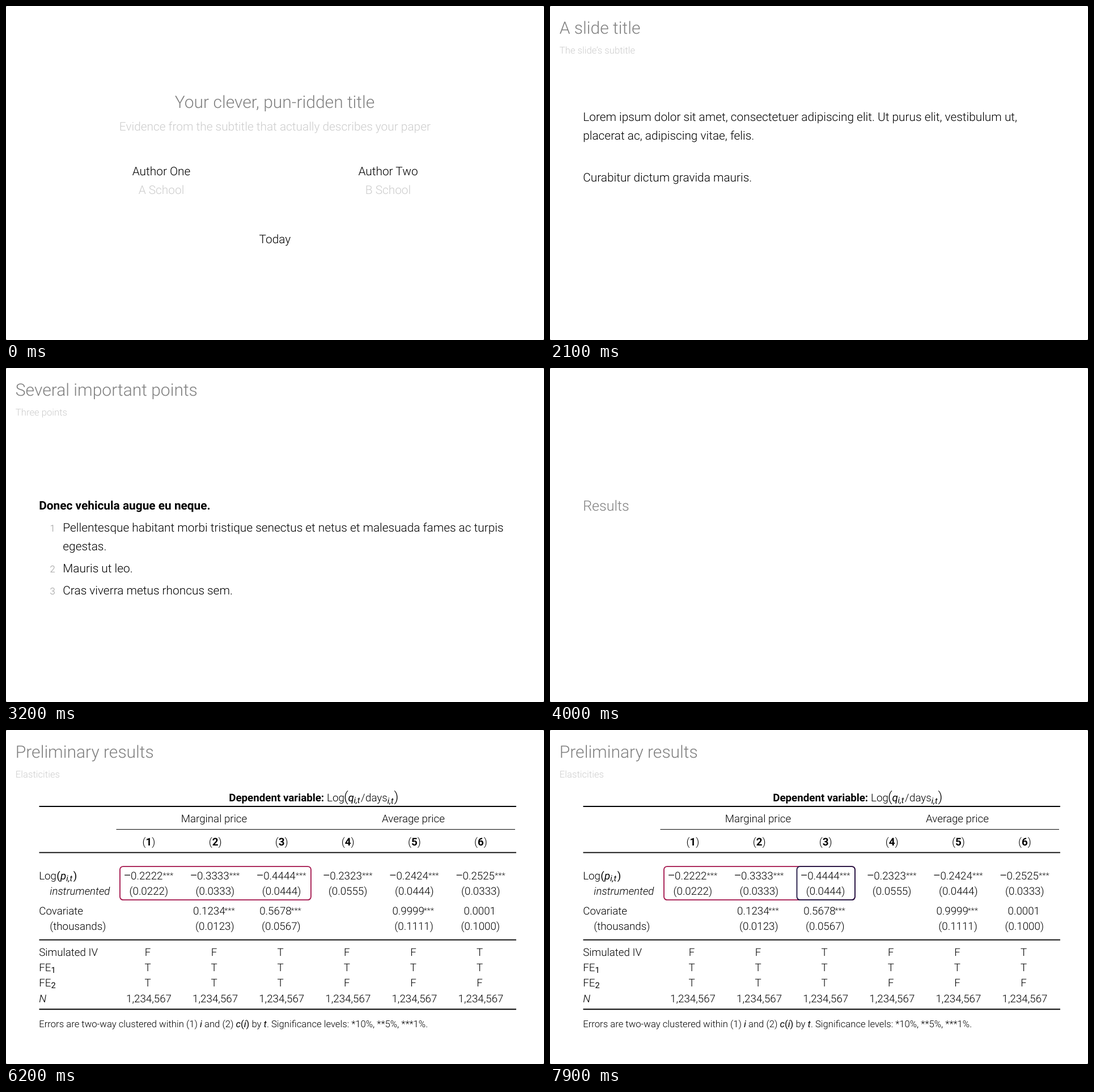
Recreate the animation shown at these times as an HTML page with a canvas. Size 949 by 590 pixels, loop 8 s.

```html
<!DOCTYPE html>
<html lang="en">
<head>
<meta charset="utf-8">
<title>Slides</title>
<style>
  html, body { margin: 0; width: 100%; height: 100%; overflow: hidden; background: #fff; }
  canvas { display: block; width: 949px; height: 590px; }
</style>
</head>
<body>
<canvas id="stage"></canvas>
<script>
const W = 949, H = 590, LOOP = 8000;
const canvas = document.getElementById('stage');
const ctx = canvas.getContext('2d');
const ratio = window.devicePixelRatio || 1;
canvas.width = W * ratio;
canvas.height = H * ratio;
ctx.scale(ratio, ratio);
ctx.textRendering = 'geometricPrecision';
ctx.fontKerning = 'normal';

const PT = 2.085;
const TINY = 7 * PT, FOOT = 8 * PT, SMALL = 9 * PT, BODY = 10 * PT, LARGE = 12 * PT, TITLE = 14.4 * PT;
const BLACK = '#000', GRAY = '#808080', PALE = '#ccc';
const LEFT = 58.2, INDENT = 77.3, ITEM = 100.3;
const MATH = 'italic 400';

const font = (size, style = '300') => `${style} ${size}px Roboto, sans-serif`;

function text(str, x, y, { size = BODY, color = BLACK, align = 'left', style } = {}) {
  ctx.font = font(size, style);
  ctx.fillStyle = color;
  ctx.textAlign = align;
  ctx.fillText(str, x, y);
}

// Each part is [string, style, size, drop]; the parts follow one another.
function run(x, y, parts, size = SMALL, align = 'left') {
  const widths = parts.map(([str, style, s = size]) => {
    ctx.font = font(s, style);
    return ctx.measureText(str).width;
  });
  if (align === 'center') x -= widths.reduce((a, b) => a + b, 0) / 2;
  parts.forEach(([str, style, s = size, drop = 0], i) => {
    text(str, x, y + drop, { size: s, style });
    x += widths[i];
  });
}

function rule(x1, x2, y, thick) {
  ctx.fillStyle = BLACK;
  ctx.fillRect(x1, y - thick / 2, x2 - x1, thick);
}

function frameBox(x1, x2, color) {
  ctx.strokeStyle = color;
  ctx.lineWidth = 1.8;
  ctx.beginPath();
  ctx.roundRect(x1, 241.1, x2 - x1, 59, 5.5);
  ctx.stroke();
}

function heading(title, subtitle) {
  text(title, 16.8, 49, { size: TITLE, color: GRAY });
  text(subtitle, 16.8, 84.2, { size: FOOT, color: PALE });
}

function cover() {
  const mid = { align: 'center' };
  text('Your clever, pun-ridden title', 474, 179.6, { ...mid, size: TITLE, color: GRAY });
  text('Evidence from the subtitle that actually describes your paper', 474.4, 219.5, { ...mid, color: PALE });
  [['Author One', 'A School', 274], ['Author Two', 'B School', 674]].forEach(([name, school, x]) => {
    text(name, x, 299.4, mid);
    text(school, x, 331.7, { ...mid, color: PALE });
  });
  text('Today', 474.4, 418.6, mid);
}

function prose(step) {
  heading('A slide title', 'The slide’s subtitle');
  text('Lorem ipsum dolor sit amet, consectetuer adipiscing elit. Ut purus elit, vestibulum ut,', LEFT, 203.3);
  text('placerat ac, adipiscing vitae, felis.', LEFT, 235.6);
  if (step > 0) text('Curabitur dictum gravida mauris.', LEFT, 309.6);
  if (step > 1) {
    text('Nam arcu libero, nonummy eget,', LEFT, 383);
    text('vulputate a, magna,', LEFT, 415.3);
    text('consectetuer id.', LEFT, 447.6);
  }
}

function points() {
  heading('Several important points', 'Three points');
  text('Donec vehicula augue eu neque.', LEFT, 250.3, { style: '700' });
  const items = [
    ['Pellentesque habitant morbi tristique senectus et netus et malesuada fames ac turpis', 289.2],
    ['Mauris ut leo.', 360.5],
    ['Cras viverra metus rhoncus sem.', 399.5]
  ];
  items.forEach(([str, y], i) => {
    text(i + 1, 86.8, y, { size: FOOT, color: '#999', align: 'right' });
    text(str, ITEM, y);
  });
  text('egestas.', ITEM, 321.5);
}

function section() {
  text('Results', LEFT, 252, { size: LARGE, color: GRAY });
}

const COEFS = ['2222', '3333', '4444', '2323', '2424', '2525'];
const ERRORS = ['0222', '0333', '0444', '0555', '0444', '0333'];
const COVS = ['', '1234', '5678', '', '9999', '0001'];
const COV_ERRORS = ['', '0123', '0567', '', '1111', '1000'];
const FLAGS = [['FFTFFT', 398.6], ['TTTTTT', 426], ['TTTFFF', 453.3]];

function tableHead() {
  const y = 125.6, small = { size: SMALL };
  const script = { size: TINY, style: MATH }, tall = { size: 24 };
  text('Dependent variable:', 393.2, y, { size: SMALL, style: '700' });
  text('Log', 566, y, small);
  text('(', 596, 126.2, tall);
  text('q', 603.5, y, { size: SMALL, style: MATH });
  text('i,t', 613.6, 128.6, script);
  text('/', 626, y, small);
  text('days', 634, y, small);
  text('i,t', 672.8, 130, script);
  text(')', 684.5, 126.2, tall);

  const mid = { size: SMALL, align: 'center' };
  text('Marginal price', 367, 163, mid);
  text('Average price', 718.5, 163, mid);
  rule(58.5, 900, 135, 2);
  rule(194.5, 898, 175.6, 1);
  rule(58.5, 900, 216.5, 1.8);
  rule(58.5, 900, 370.7, 1.8);
  rule(58.5, 900, 493.3, 2);
}

function tableLabels() {
  const small = { size: SMALL };
  text('Log', LEFT, 263.5, small);
  text('(', 89.2, 263.5, { size: SMALL, style: '400' });
  text('p', 96, 263.5, { size: SMALL, style: MATH });
  text('i,t', 106.3, 266.5, { size: TINY, style: MATH });
  text(')', 118.8, 263.5, { size: SMALL, style: '400' });
  text('instrumented', INDENT, 290.8, { size: SMALL, style: 'italic 300' });
  text('Covariate', LEFT, 325.7, small);
  text('(thousands)', INDENT, 353, small);
  text('Simulated IV', LEFT, 398.6, small);
  run(LEFT, 426, [['FE'], ['1', '400', TINY, 3]]);
  run(LEFT, 453.3, [['FE'], ['2', '400', TINY, 3]]);
  text('N', LEFT, 480.7, { size: SMALL, style: 'italic 300' });
}

function tableColumn(i) {
  const x = 250 + i * 117.1;
  const small = { size: SMALL }, mid = { size: SMALL, align: 'center' };
  const stars = (at, y) => text('***', at, y - 2, { size: TINY, color: '#222' });

  run(x + 2, 204, [['('], [i + 1, '700'], [')']], SMALL, 'center');
  text('−', x - 36, 265.2, { size: 24, align: 'center' });
  text('0.' + COEFS[i], x - 30, 263.5, small);
  stars(x + 26.6, 263.5);
  text(`(0.${ERRORS[i]})`, x + 1.8, 290.8, mid);
  if (COVS[i]) {
    const starred = i < 5;
    text('0.' + COVS[i], starred ? x - 37 : x - 28, 325.7, small);
    if (starred) stars(x + 18, 325.7);
    text(`(0.${COV_ERRORS[i]})`, x + 1.2, 353, mid);
  }
  FLAGS.forEach(([row, y]) => text(row[i], x, y, mid));
  text('1,234,567', x + 2, 480.7, mid);
}

function results(step) {
  heading('Preliminary results', 'Elasticities');
  tableHead();
  tableLabels();
  for (let i = 0; i < 6; i++) tableColumn(i);
  run(LEFT, 525.4, [
    ['Errors are two-way clustered within (1) '], ['i', MATH], [' and (2) '],
    ['c', MATH], ['(', '400'], ['i', MATH], [')', '400'],
    [' by '], ['t', MATH], ['. Significance levels: *10%, **5%, ***1%.']
  ], FOOT);
  if (step > 0) frameBox(201, 537.9, '#a2124a');
  if (step > 1) frameBox(435.5, 537.9, '#1c1240');
}

// Window corners peek out behind the slide.
function corners() {
  ctx.fillStyle = '#777';
  for (const [x, y, dx, dy] of [[0, 0, 1, 1], [W, 0, -1, 1], [0, H, 1, -1], [W, H, -1, -1]]) {
    ctx.beginPath();
    ctx.moveTo(x, y);
    ctx.lineTo(x + 1.6 * dx, y);
    ctx.lineTo(x, y + 1.6 * dy);
    ctx.fill();
  }
}

const SCENES = [
  [0, cover],
  [900, () => prose(0)],
  [1500, () => prose(1)],
  [2400, () => prose(2)],
  [3000, points],
  [4000, section],
  [4800, () => results(0)],
  [5500, () => results(1)],
  [7900, () => results(2)]
];

const start = performance.now();

function draw() {
  const t = (performance.now() - start) % LOOP;
  const scene = SCENES.filter(([at]) => at <= t).pop()[1];
  ctx.fillStyle = '#fff';
  ctx.fillRect(0, 0, W, H);
  scene();
  corners();
  requestAnimationFrame(draw);
}
draw();
</script>
</body>
</html>
```
